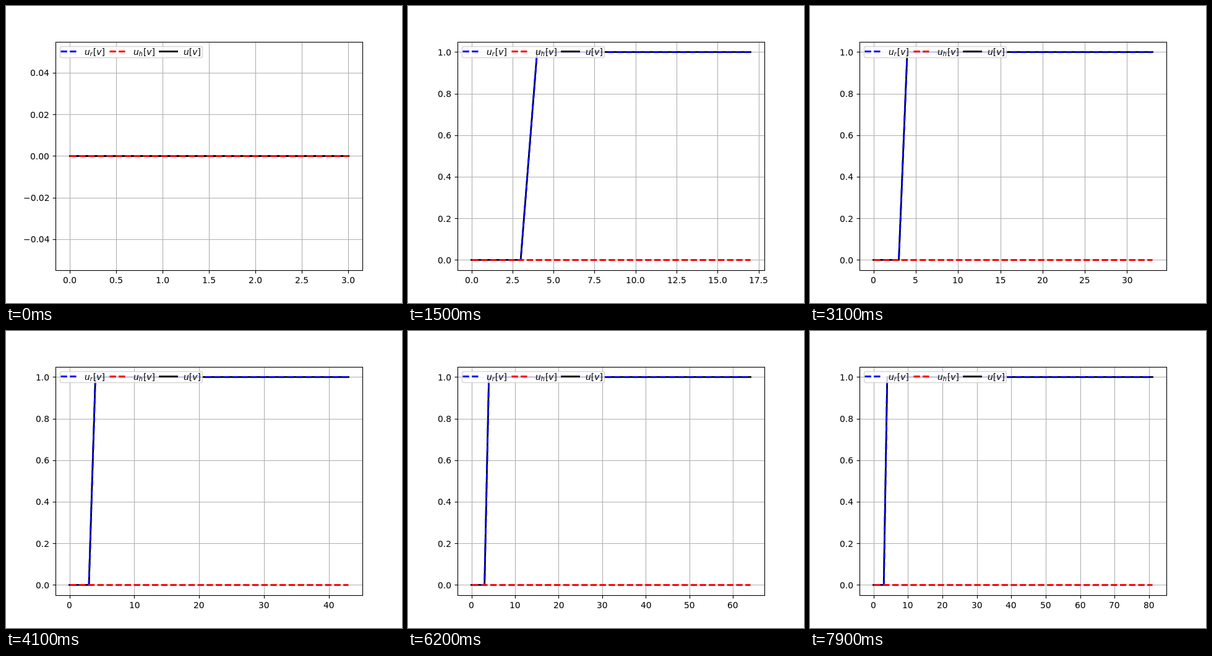
An HTML page with a canvas for the animation above (8 s loop, 640x480 px).

```html
<!DOCTYPE html>
<html lang="en">
<head>
<meta charset="utf-8">
<title>Step response plot</title>
<style>
  html, body { margin: 0; width: 100%; height: 100%; overflow: hidden; background: #fff; }
  canvas { display: block; }
</style>
</head>
<body>
<canvas id="plot" width="640" height="480"></canvas>
<script>
const ctx = document.getElementById('plot').getContext('2d');

const LOOP = 8000, STEP_MS = 100;
const PT = 100 / 72;                 // pixels per point
const AXES = { left: 80, right: 576, top: 57.6, bottom: 427.2 };
const FONT_PX = 10 * PT;
const FAMILY = '"DejaVu Sans", sans-serif';
const THIN = 0.8 * PT, THICK = 2 * PT;
const DASH = [7.4 * PT, 3.2 * PT];
const TICK = 3.5 * PT, LABEL_GAP = 7 * PT;

const snap = v => Math.floor(v + 0.5) + 0.5;
const snapPoint = ([x, y]) => [snap(x), snap(y)];

function stroke(points, color, width, { dash = [], cap = 'butt' } = {}) {
  ctx.strokeStyle = color;
  ctx.lineWidth = width;
  ctx.lineCap = cap;
  ctx.lineJoin = 'round';
  ctx.setLineDash(dash);
  ctx.beginPath();
  points.forEach(([x, y]) => ctx.lineTo(x, y));
  ctx.stroke();
  ctx.setLineDash([]);
}

const solid = points => stroke(points, '#000', THICK, { cap: 'square' });
const dashed = (points, color) => stroke(points, color, THICK, { dash: DASH });

// Smallest round step that splits the range into at most nine parts.
function tickStep(range) {
  const raw = range / 9;
  const scale = 10 ** Math.floor(Math.log10(raw));
  return [1, 2, 2.5, 5, 10].map(s => s * scale).find(s => s >= raw);
}

function ticks(min, max) {
  const step = tickStep(max - min);
  const decimals = [0, 1, 2].find(d => Math.abs(step * 10 ** d - Math.round(step * 10 ** d)) < 1e-6);
  const list = [];
  for (let i = Math.ceil(min / step); i * step <= max; i++) {
    const value = i * step;
    list.push({ value, label: value.toFixed(decimals).replace('-', '\u2212') });
  }
  return list;
}

function setFont(style = 'normal', size = FONT_PX) {
  ctx.font = `${style} ${size}px ${FAMILY}`;
}

function drawMath(x, y, subscript) {
  const put = (text, style, size = FONT_PX, drop = 0) => {
    setFont(style, size);
    ctx.fillText(text, x, y + drop);
    x += ctx.measureText(text).width;
  };
  put('u', 'italic');
  if (subscript) {
    put(subscript, 'italic', FONT_PX * 0.7, 2);
    x += 1;
  }
  put('[', 'normal');
  put('v', 'italic');
  put(']', 'normal');
}

function drawLegend() {
  ctx.globalAlpha = 0.8;
  ctx.beginPath();
  ctx.roundRect(87.5, 65.5, 230, 18, 2.78);
  ctx.fillStyle = '#fff';
  ctx.fill();
  ctx.strokeStyle = '#ccc';
  ctx.lineWidth = PT;
  ctx.stroke();
  ctx.globalAlpha = 1;

  const handle = x => [[x, 73.5], [x + 28, 73.5]];
  dashed(handle(88.5), '#00f');
  dashed(handle(167.5), '#f00');
  solid(handle(248.5));

  ctx.fillStyle = '#000';
  drawMath(127, 79, 'r');
  drawMath(206, 79, 'h');
  drawMath(287, 79);
}

function draw(time) {
  const last = Math.max(3, Math.floor(time / STEP_MS) + 2);
  const stepped = last > 3;
  const [low, high] = stepped ? [-0.05, 1.05] : [-0.055, 0.055];
  const toX = v => AXES.left + (AXES.right - AXES.left) * (v / last + 0.05) / 1.1;
  const toY = v => AXES.bottom - (AXES.bottom - AXES.top) * (v - low) / (high - low);
  const left = snap(AXES.left), right = snap(AXES.right);
  const top = snap(AXES.top), bottom = snap(AXES.bottom);

  ctx.fillStyle = '#fff';
  ctx.fillRect(0, 0, 640, 480);
  ctx.fillStyle = '#000';
  setFont();

  const xTicks = ticks(-0.05 * last, 1.05 * last);
  const yTicks = ticks(low, high);
  for (const { value } of xTicks) {
    const x = snap(toX(value));
    stroke([[x, top], [x, bottom]], '#b0b0b0', THIN);
  }
  for (const { value } of yTicks) {
    const y = snap(toY(value));
    stroke([[left, y], [right, y]], '#b0b0b0', THIN);
  }
  for (const { value, label } of xTicks) {
    const x = toX(value);
    stroke([[snap(x), bottom], [snap(x), bottom + TICK]], '#000', THIN);
    ctx.fillText(label, Math.round(x - ctx.measureText(label).width / 2), 448);
  }
  for (const { value, label } of yTicks) {
    const y = toY(value);
    stroke([[left, snap(y)], [left - TICK, snap(y)]], '#000', THIN);
    const x = AXES.left - LABEL_GAP - ctx.measureText(label).width;
    ctx.fillText(label, Math.round(x), Math.round(y + 5.3));
  }

  const zero = [[toX(0), toY(0)], [toX(last), toY(0)]].map(snapPoint);
  const response = stepped
    ? [[0, 0], [3, 0], [4, 1], [last, 1]].map(([x, y]) => [toX(x), toY(y)])
    : zero;
  solid(response);
  dashed(response, '#00f');
  dashed(zero, '#f00');

  ctx.strokeStyle = '#000';
  ctx.lineWidth = THIN;
  ctx.lineJoin = 'miter';
  ctx.strokeRect(left, top, right - left, bottom - top);
  drawLegend();
}

function frame() {
  draw(performance.now() % LOOP);
  requestAnimationFrame(frame);
}
frame();
</script>
</body>
</html>
```
